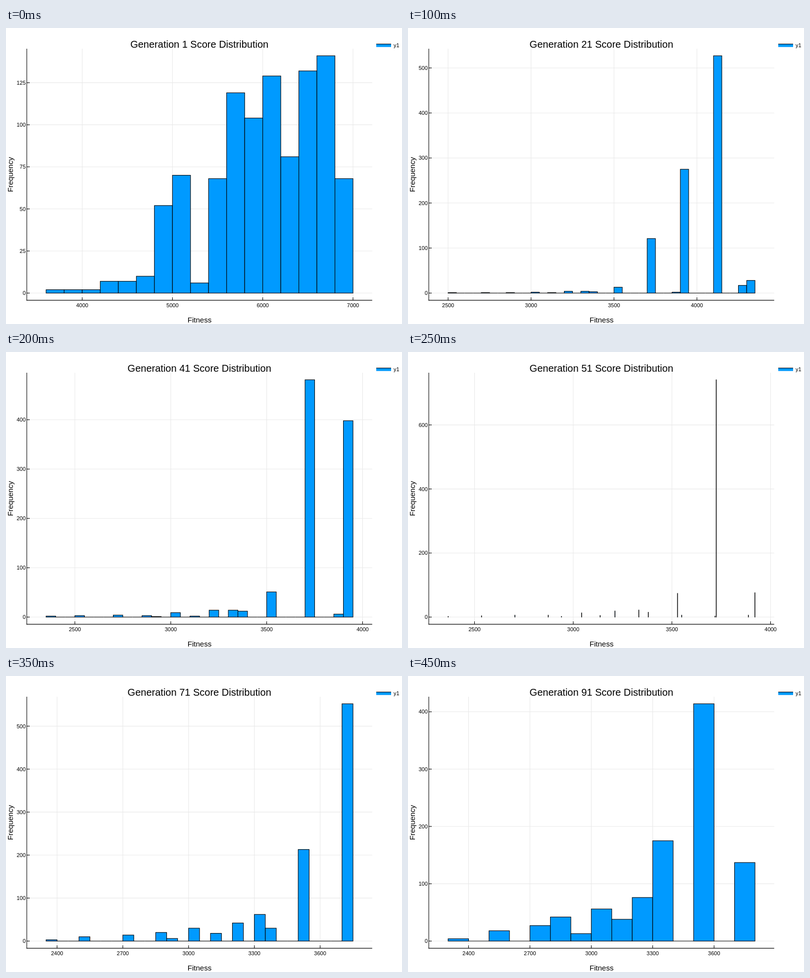
These frames come from a looping animation (800x600 px, 0.5 s). An HTML page with a canvas:

```html
<!DOCTYPE html>
<html lang="en">
<head>
<meta charset="utf-8">
<title>Score distribution</title>
<style>
  html, body { margin: 0; height: 100%; overflow: hidden; background: #fff; }
  canvas { display: block; }
</style>
</head>
<body>
<canvas id="stage" width="800" height="600"></canvas>
<script>
const ctx = document.getElementById('stage').getContext('2d');
const BLUE = '#009aff', INK = '#000', GRID = '#e9e9e9';
const FRAME_MS = 50, POPULATION = 1000;
const LEFT = 42, RIGHT = 739.8, TOP = 42, BOTTOM = 551.9;

const BIN_WIDTHS = [200, 200, 50, 50, 50, 1, 50, 50, 50, 100];

// The first two generations are broad: counts of consecutive bins.
const EARLY = [
  { lo: 3600, counts: [2, 2, 2, 7, 7, 10, 52, 70, 6, 68, 119, 104, 129, 81, 132, 141, 68] },
  { lo: 3200, counts: [1, 2, 42, 83, 142, 208, 227, 295] }
];

// Later ones share distinct scores: [score, demand at generation 41, at 91].
const SCORES = [
  [2366, 1.9, 4], [2535, 3, 18], [2704, 4, 27], [2873, 3, 42], [2940, 1, 13],
  [3042, 9, 56], [3136, 2, 38], [3211, 14, 76], [3332, 14, 122], [3380, 12, 53],
  [3528, 46, 402], [3549, 5, 12], [3718, 3, 3], [3724, 478, 3824], [3887, 6, 6],
  [3920, 1100, 1100], [4120, 2108, 2108], [4270, 68, 68], [4330, 200, 200]
];

// Demand doubles every 10 generations up to 41, then eases towards its last value.
function demand(generation, mid, late) {
  if (generation < 41) return mid * 2 ** ((generation - 41) / 10);
  return mid + (late - mid) * ((generation - 41) / 50) ** 1.58;
}

// Low scores survive first, until the population is full.
function survivors(generation) {
  let room = POPULATION;
  const alive = [];
  for (const [score, mid, late] of SCORES) {
    const n = Math.min(room, Math.round(demand(generation, mid, late)));
    room -= n;
    if (n) alive.push([score, n]);
  }
  return alive;
}

function histogram(index) {
  const bin = BIN_WIDTHS[index];
  if (EARLY[index]) return { bin, ...EARLY[index] };
  const alive = survivors(index * 10 + 1);
  const lo = Math.floor(alive[0][0] / bin) * bin;
  const last = Math.floor((alive[alive.length - 1][0] - lo) / bin);
  const counts = Array(last + 1).fill(0);
  for (const [score, n] of alive) counts[Math.floor((score - lo) / bin)] += n;
  return { bin, lo, counts };
}

const charts = BIN_WIDTHS.map((_, index) => histogram(index));

function ticks(span, maxTicks, from, toPixel, min, max) {
  const step = [25, 50, 100, 200, 250, 300, 500, 1000].find(s => s * maxTicks >= span);
  const found = [];
  for (let v = Math.floor(from / step) * step; ; v += step) {
    const p = toPixel(v);
    if (p < min || p > max) {
      if (found.length) return found;
    } else found.push([v, p]);
  }
}

function line(x1, y1, x2, y2, color = INK) {
  ctx.strokeStyle = color;
  ctx.beginPath();
  ctx.moveTo(x1, y1);
  ctx.lineTo(x2, y2);
  ctx.stroke();
}

function text(str, x, y, size, align = 'center') {
  ctx.font = `${size}px "Liberation Sans", Arial, sans-serif`;
  ctx.textAlign = align;
  ctx.fillStyle = INK;
  ctx.fillText(str, x, y);
}

function drawBars({ lo, bin, counts }, xOf, yOf) {
  const base = yOf(0);
  counts.forEach((n, i) => {
    const left = xOf(lo + i * bin), right = xOf(lo + (i + 1) * bin), top = yOf(n);
    if (n) {
      ctx.fillStyle = BLUE;
      ctx.fillRect(left, top, right - left, base - top);
      ctx.strokeStyle = INK;
      ctx.strokeRect(left, top, right - left, base - top);
    } else if (bin > 1) {
      line(left, base, right, base);
    }
  });
}

function draw(index) {
  const chart = charts[index];
  const { lo, bin, counts } = chart;
  const span = bin * counts.length, peak = Math.max(...counts);
  const xOf = v => 81 + (v - lo) * 620 / span;
  const yOf = n => 537.3 - n * 481 / peak;
  const xTicks = ticks(span, 5, lo, xOf, LEFT, RIGHT);
  const yTicks = ticks(peak, 5.75, 0, yOf, TOP, BOTTOM);

  ctx.fillStyle = '#fff';
  ctx.fillRect(0, 0, 800, 600);
  ctx.lineWidth = 1.1;
  for (const [, x] of xTicks) line(x, TOP, x, BOTTOM, GRID);
  for (const [, y] of yTicks) line(LEFT, y, RIGHT, y, GRID);

  drawBars(chart, xOf, yOf);

  line(LEFT, TOP, LEFT, BOTTOM + 0.5);
  line(LEFT - 0.5, BOTTOM, RIGHT, BOTTOM);
  for (const [v, x] of xTicks) {
    line(x, BOTTOM - 6, x, BOTTOM);
    text(v, x, 566, 11);
  }
  for (const [n, y] of yTicks) {
    line(LEFT, y, LEFT + 6, y);
    text(n, 39.8, y + 3.9, 11, 'right');
  }

  text(`Generation ${index * 10 + 1} Score Distribution`, 390.7, 40, 20);
  text('Fitness', 391, 597, 15);
  ctx.save();
  ctx.translate(13.5, 297);
  ctx.rotate(-Math.PI / 2);
  text('Frequency', 0, 0, 15);
  ctx.restore();

  ctx.fillStyle = BLUE;
  ctx.fillRect(748, 32, 30, 6.5);
  line(748, 32.5, 778, 32.5);
  text('y1', 783, 39, 11, 'left');
}

function tick() {
  draw(Math.floor(performance.now() / FRAME_MS) % charts.length);
  requestAnimationFrame(tick);
}
tick();
</script>
</body>
</html>
```
